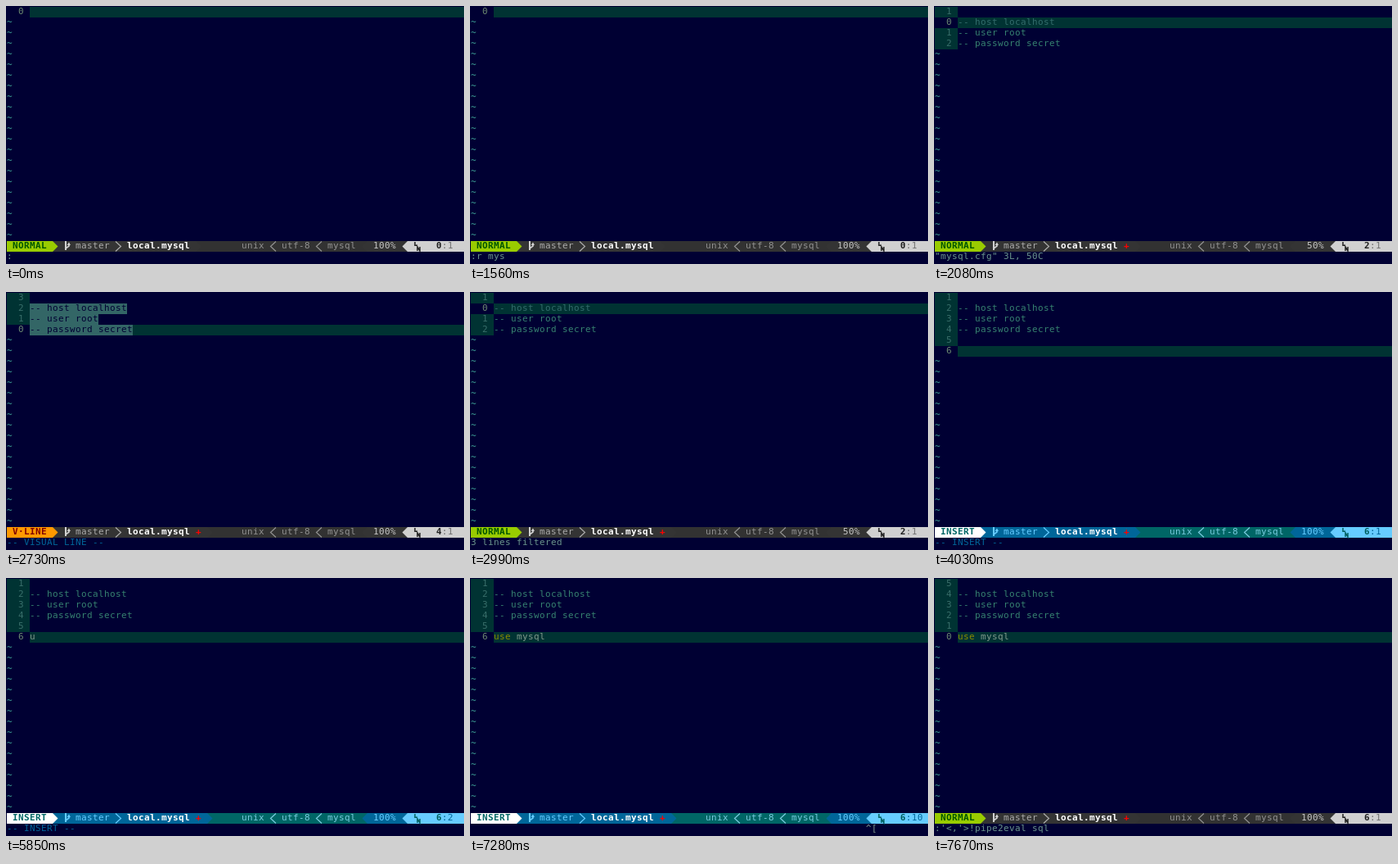
These frames come from a looping animation (560 px wide and 315 px high, 8 s). An HTML page with a canvas:

```html
<!DOCTYPE html>
<html lang="en">
<head>
<meta charset="utf-8">
<title>Editor session</title>
<style>
html, body { margin: 0; width: 100%; height: 100%; overflow: hidden; background: #000033; }
canvas { display: block; }
</style>
</head>
<body>
<canvas id="stage" width="560" height="315"></canvas>
<script>
const ctx = document.getElementById('stage').getContext('2d');
const LOOP = 8000, CW = 7, RH = 13, ROWS = 22;
const FONT = '11px "DejaVu Sans Mono", monospace';

const col = { bg: '#000033', line: '#003333', comment: '#368270', dimComment: '#336c6c',
  number: '#386e6a', current: '#6c8a70', tilde: '#338585', text: '#80998c', keyword: '#8c8c00',
  command: '#6a948c', insert: '#006699', select: '#336666' };

const normal = { label: 'NORMAL', mode: '#99cc00', modeText: '#005500', seg: '#343434', mid: '#323232',
  branch: '#acacac', info: '#929292', percent: '#c4c4c4', pos: '#d0d0d0', row: '#202020',
  column: '#707070', mark: '#d0d0d0' };
const insert = { label: 'INSERT', mode: '#ffffff', modeText: '#006666', seg: '#006699', mid: '#006666',
  branch: '#66ccff', info: '#7accdf', percent: '#66ccff', pos: '#66ccff', row: '#006060',
  column: '#006699', mark: '#66ccff' };
const visual = { ...normal, label: 'VISUAL', mode: '#ff9900', modeText: '#800000' };
const visualLine = { ...visual, label: 'V·LINE' };

const settings = ['', '-- host localhost', '-- user root', '-- password secret'];
const filter = ":'<,'>!pipe2eval sql";

// Each step changes only the listed fields.
const steps = [
  [0, { theme: normal, lines: [''], cur: 1, pos: '0:1', cmd: ':', changed: false, select: null, echo: '' }],
  [650, { cmd: ':r' }],
  [1040, { cmd: ':r m' }],
  [1170, { cmd: ':r my' }],
  [1560, { cmd: ':r mys' }],
  [1690, { cmd: ':r mysq' }],
  [1820, { cmd: ':r mysql.cfg' }],
  [2080, { lines: settings, cur: 2, pos: '2:1', cmd: '"mysql.cfg" 3L, 50C', changed: true }],
  [2600, { theme: visual, cmd: '-- VISUAL --' }],
  [2730, { theme: visualLine, cmd: '-- VISUAL LINE --', cur: 4, pos: '4:1', select: [2, 4] }],
  [2860, { theme: normal, cmd: filter, cur: 2, pos: '2:1', select: null }],
  [2990, { cmd: '3 lines filtered' }],
  [3380, { cur: 4, pos: '4:1' }],
  [3900, { theme: insert, lines: [...settings, ''], cur: 5, pos: '5:1', cmd: '-- INSERT --' }],
  [4030, typed('')],
  [5850, typed('u')],
  [5980, typed('us')],
  [6110, typed('use')],
  [6370, typed('use m')],
  [6500, typed('use my')],
  [6630, typed('use mys')],
  [6760, typed('use mysql')],
  [7280, { cmd: '', echo: '^[' }],
  [7410, { theme: normal, pos: '6:9', echo: '' }],
  [7540, { theme: visualLine, cmd: '-- VISUAL LINE --', select: [6, 6] }],
  [7670, { theme: normal, pos: '6:1', cmd: filter, select: null }]
];

function typed(text) {
  return { lines: [...settings, '', text], cur: 6, pos: '6:' + (text.length + 1) };
}

const x = c => 1 + c * CW;
const y = r => 1 + r * RH;

function box(c, r, width, fill) {
  ctx.fillStyle = fill;
  ctx.fillRect(x(c), y(r), width * CW, RH);
}

function put(str, c, r, fill, bold) {
  ctx.font = (bold ? 'bold ' : '') + FONT;
  ctx.fillStyle = fill;
  [...str].forEach((ch, i) => ch !== ' ' && ctx.fillText(ch, x(c + i), y(r) + 9));
}

function stroke(color, width, ...points) {
  ctx.strokeStyle = color;
  ctx.lineWidth = width;
  ctx.beginPath();
  for (const [px, py] of points) ctx.lineTo(px, py);
  ctx.stroke();
}

// Chevron within one cell; dir 1 points right, -1 left.
function chevron(c, dir, color, solid) {
  const base = dir > 0 ? x(c) : x(c + 1), top = y(ROWS);
  const tip = [base + dir * (CW - 0.5), top + RH / 2];
  if (!solid) return stroke(color, 1.2, [base, top + 0.5], tip, [base, top + RH - 0.5]);
  ctx.fillStyle = color;
  ctx.beginPath();
  ctx.moveTo(base, top);
  ctx.lineTo(...tip);
  ctx.lineTo(base, top + RH);
  ctx.fill();
}

function branchIcon(color) {
  const left = x(10), top = y(ROWS);
  stroke(color, 2, [left + 2, top], [left + 2, top + 11]);
  stroke(color, 1.6, [left + 2, top + 9], [left + 6, top + 6], [left + 6, top + 3]);
  ctx.fillStyle = color;
  ctx.beginPath();
  ctx.moveTo(left + 3.5, top + 5);
  ctx.lineTo(left + 6, top + 1.5);
  ctx.lineTo(left + 8, top + 5);
  ctx.fill();
}

function lineIcon(color) {
  const left = x(71) + 1, top = y(ROWS) + 1;
  stroke(color, 1.5, [left + 1, top], [left + 1, top + 4.3], [left + 4, top + 4.3]);
  stroke(color, 1.5, [left + 4, top + 11], [left + 4, top + 6], [left + 7, top + 11], [left + 7, top + 6]);
}

function drawStatus(s) {
  const t = s.theme, r = ROWS, end = s.changed ? 35 : 33;
  box(0, r, 80, t.mid);
  box(8, r, end - 8, t.seg);
  chevron(end, 1, t.seg, true);
  box(0, r, 8, t.mode);
  chevron(8, 1, t.mode, true);
  put(t.label, 1, r, t.modeText, true);
  branchIcon(t.mark);
  put('master', 12, r, t.branch);
  chevron(19, 1, t.branch);
  put('local.mysql', 21, r, '#ffffff', true);
  if (s.changed) put('+', 33, r, '#ff0000', true);

  put('unix', 41, r, t.info);
  chevron(46, -1, t.info);
  put('utf-8', 48, r, t.info);
  chevron(54, -1, t.info);
  put('mysql', 56, r, t.info);
  chevron(62, -1, t.seg, true);
  box(63, r, 7, t.seg);
  const percent = Math.round(100 * s.cur / s.lines.length) + '%';
  put(percent.padStart(4), 64, r, t.percent);
  chevron(69, -1, t.pos, true);
  box(70, r, 10, t.pos);
  lineIcon(t.row);
  const [row, column] = s.pos.split(':');
  put(row, 75, r, t.row, true);
  put(':' + column, 76, r, t.column);
}

function drawLine(s, str, i) {
  const n = i + 1, here = n === s.cur;
  const relative = s.theme !== insert;
  const selected = s.select && n >= s.select[0] && n <= s.select[1];
  if (here) box(4, i, 76, col.line);
  else box(0, i, 4, col.line);
  if (selected) box(4, i, str.length, col.select);
  const label = relative ? Math.abs(n - s.cur) : n;
  put(String(label), 2, i, here ? col.current : col.number);

  const comment = here ? col.dimComment : col.comment;
  const plain = str.startsWith('--') ? comment : col.text;
  const keyword = /^use\b/.test(str) ? 3 : 0;
  put(str.slice(0, keyword), 4, i, selected ? col.bg : col.keyword);
  put(str.slice(keyword), 4 + keyword, i, selected ? col.bg : plain);
}

function draw(s) {
  ctx.fillStyle = col.bg;
  ctx.fillRect(0, 0, 560, 315);
  s.lines.forEach((str, i) => drawLine(s, str, i));
  for (let r = s.lines.length; r < ROWS; r++) put('~', 0, r, col.tilde, true);
  drawStatus(s);
  put(s.cmd, 0, ROWS + 1, s.cmd.startsWith('-- ') ? col.insert : col.command);
  put(s.echo, 69, ROWS + 1, col.text);
}

function stateAt(time) {
  const state = {};
  for (const [at, change] of steps) if (at <= time) Object.assign(state, change);
  return state;
}

let start;
function tick(now) {
  start ??= now;
  draw(stateAt((now - start) % LOOP));
  requestAnimationFrame(tick);
}
draw(stateAt(0));
requestAnimationFrame(tick);
</script>
</body>
</html>
```
